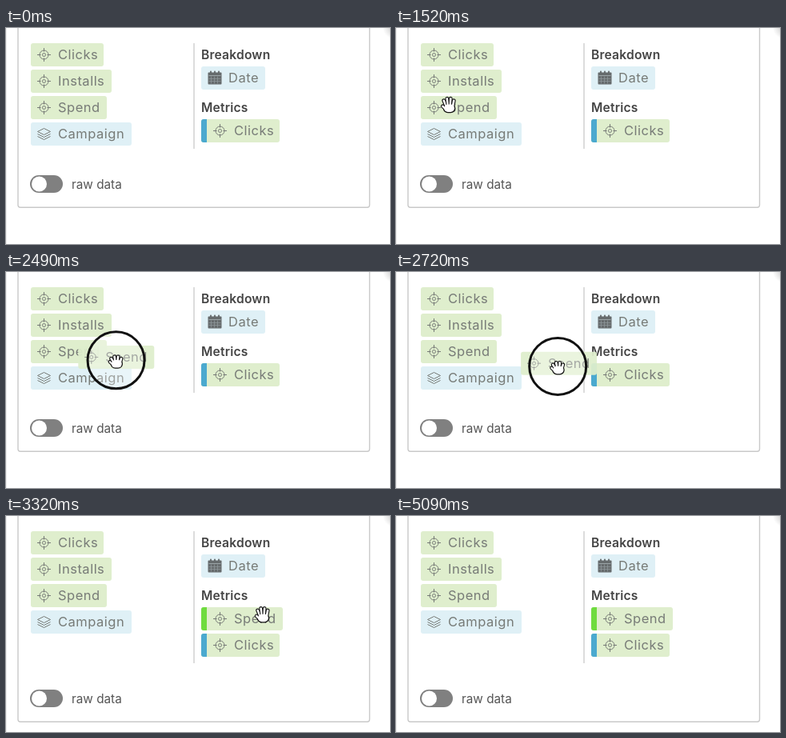
Write an HTML page with a canvas that moves like this. It is 480 px wide and 270 px high and loops after 5.92 s.

```html
<!DOCTYPE html>
<html lang="en">
<head>
<meta charset="utf-8">
<title>Drag a metric</title>
<style>
html, body { margin: 0; width: 100%; height: 100%; overflow: hidden; background: #fff; }
canvas { display: block; width: 480px; height: 270px; }
</style>
</head>
<body>
<canvas id="stage" width="480" height="270"></canvas>
<script>
const LOOP = 5920, PRESS = 1890, DRAG = 2100, RELEASE = 2935, DROP = 3060;
const GREEN = '#dfeecd', BLUE = '#dff0f6', INK = '#777b77';
const ctx = document.getElementById('stage').getContext('2d');

const clamp = v => Math.max(0, Math.min(1, v));
const ease = (t, from, to) => (1 - Math.cos(Math.PI * clamp((t - from) / (to - from)))) / 2;
const mix = (a, b, v) => a + (b - a) * v;

function box(x, y, w, h, r, fill) {
  ctx.beginPath();
  ctx.roundRect(x, y, w, h, r);
  ctx.fillStyle = fill;
  ctx.fill();
}

function line(color, width, ...points) {
  ctx.beginPath();
  points.forEach(([x, y]) => ctx.lineTo(x, y));
  ctx.strokeStyle = color;
  ctx.lineWidth = width;
  ctx.stroke();
}

function ring(x, y, r, color, width, fill) {
  ctx.beginPath();
  ctx.arc(x, y, r, 0, 2 * Math.PI);
  if (fill) { ctx.fillStyle = fill; ctx.fill(); }
  ctx.strokeStyle = color;
  ctx.lineWidth = width;
  ctx.stroke();
}

function text(str, x, y, font, color, spacing) {
  ctx.font = font + ' Inter, sans-serif';
  ctx.letterSpacing = spacing + 'px';
  ctx.fillStyle = color;
  ctx.fillText(str, x, y);
}

const icons = {
  target(x, y) {
    ring(x, y, 5.5, INK, 1);
    ring(x, y, 2, INK, 1);
    for (const [dx, dy] of [[1, 0], [-1, 0], [0, 1], [0, -1]])
      line(INK, 1, [x + dx * 4, y + dy * 4], [x + dx * 8.5, y + dy * 8.5]);
  },
  layers(x, y) {
    line(INK, 1, [x - 8, y - 3], [x, y - 7], [x + 8, y - 3], [x, y + 1], [x - 8, y - 3]);
    for (const d of [1, 4])
      line(INK, 1, [x - 8, y - 1 + d], [x, y + 3 + d], [x + 8, y - 1 + d]);
  },
  calendar(x, y) {
    const dark = '#666b6d';
    box(x - 8, y - 7, 17, 15, 1, dark);
    for (const dx of [-5, 0, 5]) box(x + dx - 0.5, y - 9, 2, 4, 1, dark);
    line('#a9b4b8', 0.8, [x - 7, y - 3], [x + 8, y - 3]);
    for (const dx of [-4, 0, 4]) line('#929c9f', 0.7, [x + dx, y - 2], [x + dx, y + 7]);
    for (const dy of [1, 4]) line('#929c9f', 0.7, [x - 7, y + dy], [x + 8, y + dy]);
  }
};

// x is the left edge of the label, y the top of the chip
function chip(label, x, y, tail, fill, icon, bar) {
  const left = x - (bar ? 41 : 34);
  box(left, y, x + tail - left, 29, 3, fill);
  if (bar) box(left, y, 7, 29, [3, 0, 0, 3], bar);
  icons[icon](x - 17.5, y + 14.5);
  text(label, x, y + 20.2, '16.5px', INK, 0.5);
}

function panel(dropped) {
  const grow = dropped ? 33 : 0;
  ctx.fillStyle = '#fff';
  ctx.fillRect(0, 0, 480, 270);
  ctx.fillStyle = '#eee';
  ctx.fillRect(0, 0, 1, 270);
  const shade = ctx.createRadialGradient(484, 0, 0, 484, 0, 13);
  shade.addColorStop(0, '#ccc');
  shade.addColorStop(1, '#ccc0');
  ctx.fillStyle = shade;
  ctx.fillRect(468, 0, 12, 14);

  ctx.beginPath();
  ctx.roundRect(15, -10, 439.5, 234.3 + grow, 3);
  ctx.strokeStyle = '#c9c9c9';
  ctx.lineWidth = 1.4;
  ctx.stroke();
  line('#dcdcdc', 2, [235, 19], [235, 151 + grow]);

  chip('Clicks', 65, 19, 57, GREEN, 'target');
  chip('Installs', 65, 52, 67, GREEN, 'target');
  chip('Spend', 65, 85, 61, GREEN, 'target');
  chip('Campaign', 65, 118, 92, BLUE, 'layers');

  text('Breakdown', 244, 39, '600 15.6px', '#444', 0.2);
  text('Metrics', 244, 105, '600 15.6px', '#444', 0.2);
  chip('Date', 278, 48, 46, BLUE, 'calendar');
  if (dropped) chip('Spend', 285, 114, 61, GREEN, 'target', '#6fdc3f');
  chip('Clicks', 285, 114 + grow, 57, GREEN, 'target', '#4ba9cf');

  box(30, 184 + grow, 41, 22, 11, '#808080');
  box(32, 185.5 + grow, 19, 19, 9.5, '#fff');
  text('raw data', 82, 200.5 + grow, '15.3px', '#555', 0);
}

// Rests and moves of the pointer's hot spot
function pointer(t) {
  if (t < 2090) {
    const v = ease(t, 220, 1750);
    return [mix(22, 67, v) + 24 * v * (1 - v), mix(-13, 102, v)];
  }
  if (t < 2990) {
    const v = ease(t, 2090, 2990);
    return [mix(67, 237, v), mix(102, 122, v)];
  }
  if (t < 4100) {
    const v = ease(t, 2990, 3350);
    return [mix(237, 322, v), mix(122, 123, v)];
  }
  const v = ease(t, 4160, 4760);
  return [mix(322, 495, v), mix(123, 136, v)];
}

function arrow(x, y) {
  ctx.beginPath();
  for (const [dx, dy] of [[0, 0], [0, 15], [3.5, 12], [6, 18], [8.5, 17], [6, 11], [11, 11]])
    ctx.lineTo(x + dx, y + dy);
  ctx.closePath();
  ctx.strokeStyle = '#fff';
  ctx.lineWidth = 2.5;
  ctx.stroke();
  ctx.fillStyle = '#000';
  ctx.fill();
}

function hand(x, y, closed) {
  const lift = closed ? 3 : 0;
  const palm = [[x - 1, y + 4.5], [x + 2.5, y + 4.5]];
  const fingers = [[-7.5, 2, -3, 6], [-6, -5 + lift, -2.5, 3], [-2, -7.5 + lift, -0.5, 3],
                   [2.5, -7.5 + lift, 2, 3], [6.5, -5 + lift, 5, 3]];
  ctx.lineCap = 'round';
  line('#111', 12, ...palm);
  for (const [ax, ay, bx, by] of fingers) {
    const finger = [[x + ax, y + ay], [x + bx, y + by]];
    line('#111', 4.8, ...finger);
    line('#fff', 2.6, ...finger);
  }
  line('#fff', 9.5, ...palm);
  ctx.lineCap = 'butt';
}

function draw() {
  const t = performance.now() % LOOP;
  const [x, y] = pointer(t);
  panel(t >= DROP);

  if (t >= DRAG && t < DROP) {
    const [gx, gy] = pointer(t - 25);
    const pull = Math.min(4, gx - 67);
    ctx.globalAlpha = 0.94;
    chip('Spend', 65 + gx - 67 - pull, 85 + gy - 102 - pull / 8, 61, GREEN, 'target');
    ctx.globalAlpha = 1;
  }

  const radius = 35.5 * (1 - clamp((t - RELEASE) / 185));
  if (t >= PRESS && radius > 0) ring(x, y, radius, '#111', 3, 'rgba(255,255,255,.3)');

  if (t > 220 && t < 4760) {
    const overChip = t > 765 && t < RELEASE || t > 3140;
    if (overChip) hand(x, y, t >= PRESS && t < RELEASE);
    else arrow(x, y);
  }
  requestAnimationFrame(draw);
}
draw();
</script>
</body>
</html>
```
